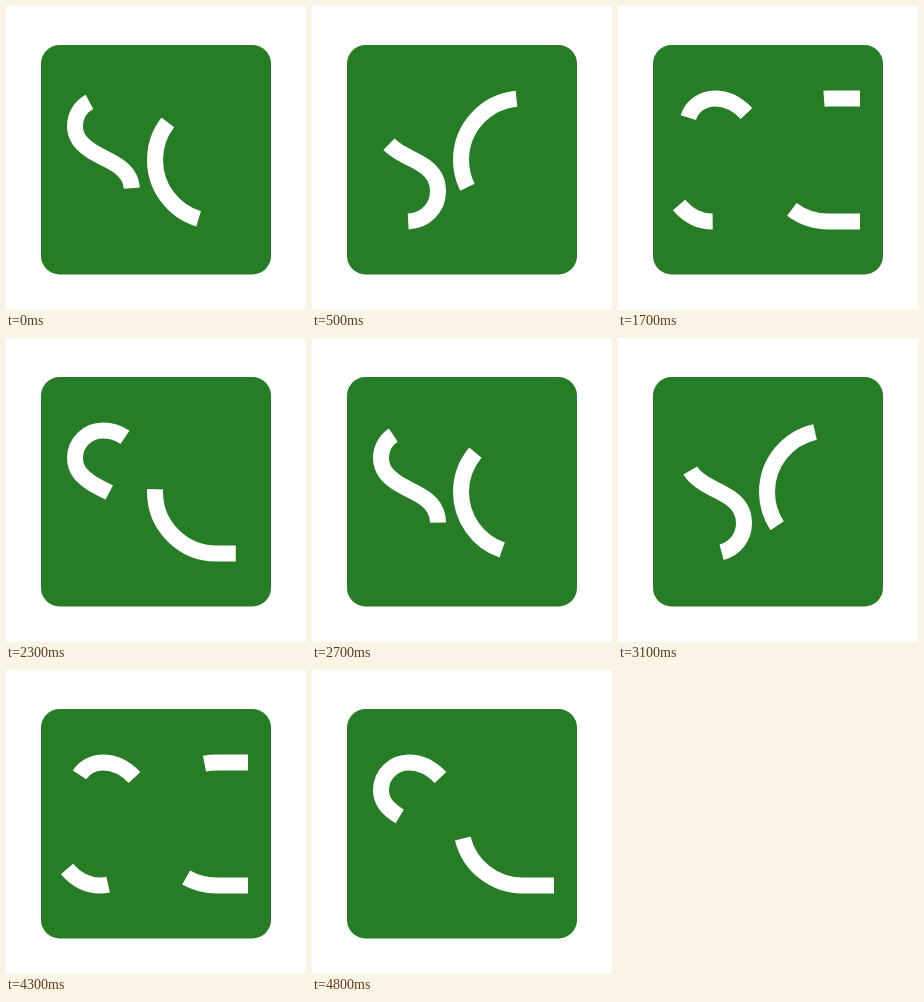
Animation, 300 px wide and 304 px high, one loop 4.9 s. Source, as an HTML page:

```html
<!DOCTYPE html>
<html lang="en">
<head>
<meta charset="utf-8">
<title>Letter loader</title>
<style>
  html, body { margin: 0; width: 100%; height: 100%; overflow: hidden; background: #fff; }
  svg { display: block; width: 300px; height: 304px; }
  path { fill: none; stroke: #fff; stroke-width: 16; stroke-dasharray: 118.5 149; }
</style>
</head>
<body>
<svg viewBox="0 0 300 304">
  <rect x="35" y="39" width="230" height="229.5" rx="18.5" fill="#267d26"/>
  <path id="s" d="M128.5 107.5C119 97.5 109 92.5 97 92.5C81.5 92.5 69 104.5 69 120
    C69 132 76 139 87 146C96 151.5 104 154 113 160.5C122 167 126 175 126 185
    C126 203 112 215.5 94 215.5C81 215.5 70 209.5 61 199"/>
  <path id="c" d="M242 92.5H210.5A61.5 61.5 0 0 0 210.5 215.5H242"/>
</svg>
<script>
  const LOOP = 4900, STEPS = 49, STEP_LENGTH = 10;

  // Slides the dash along a letter: start is its first position, dir its direction.
  function slide(id, start, dir) {
    const end = start + dir * STEPS * STEP_LENGTH;
    document.getElementById(id).animate(
      [start, end].map(pos => ({ strokeDashoffset: -pos + "px" })),
      { duration: LOOP, iterations: Infinity, easing: `steps(${STEPS}, end)` }
    );
  }

  slide("s", 50, 1);
  slide("c", 87.6, -1);
</script>
</body>
</html>
```
